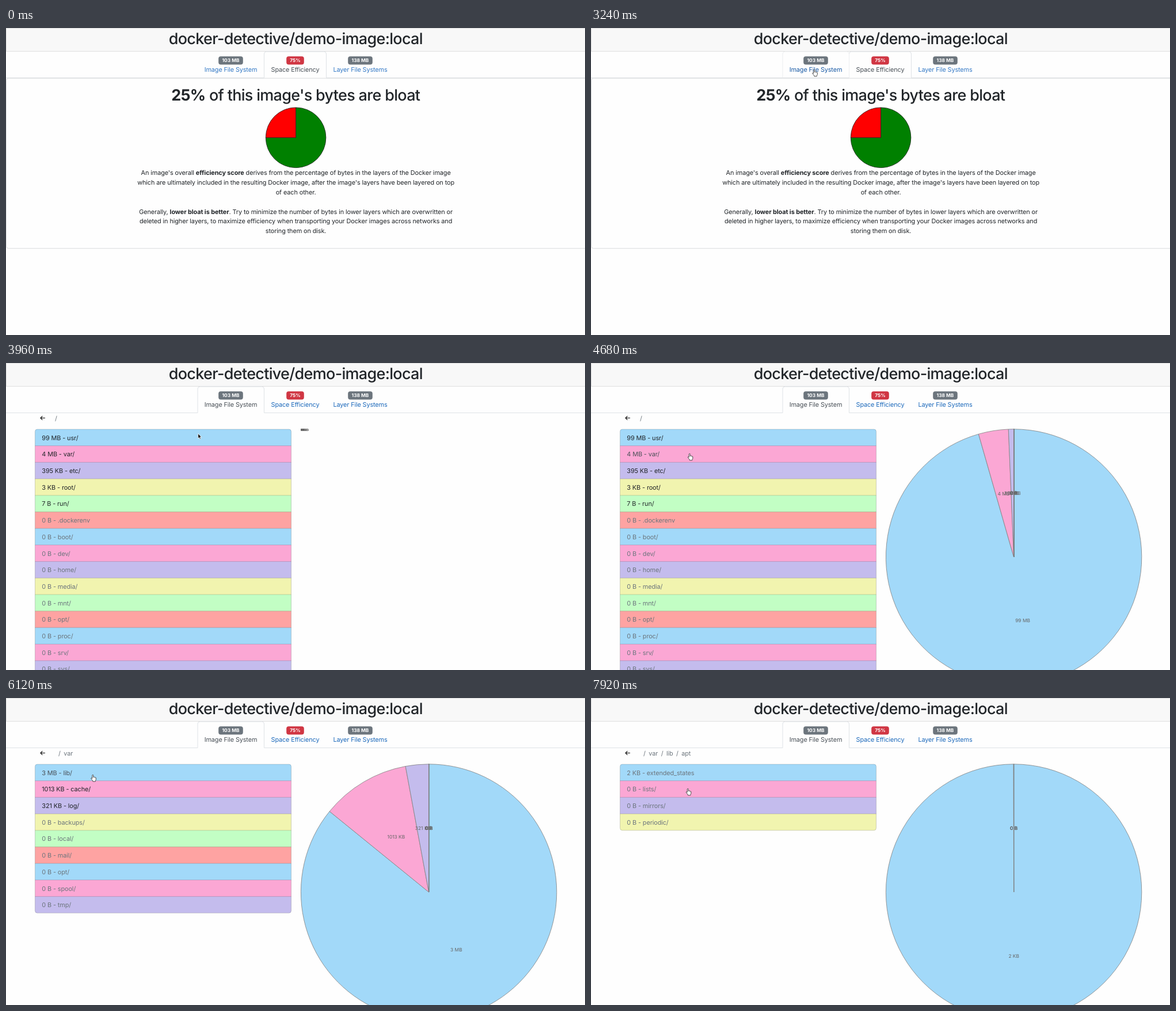
Recreate the animation shown at these times as an HTML page. Size 1006x533 px, loop 8 s.

```html
<!DOCTYPE html>
<html lang="en">
<head>
<meta charset="utf-8">
<title>Image inspector</title>
<style>
  html, body { margin: 0; width: 100%; height: 100%; overflow: hidden; background: #fefefe; }
  svg { display: block; }
  #stage { width: 1006px; height: 533px; }
  text {
    font: 400 10.9px Inter, "Liberation Sans", sans-serif;
    font-optical-sizing: none;
    letter-spacing: -.11px;
    text-rendering: geometricPrecision;
    fill: #212529;
    white-space: pre;
  }
  .mid { text-anchor: middle; }
  .big { font-size: 27px; font-weight: 500; letter-spacing: -.69px; }
  .bold { font-weight: 700; }
  .badge { font-size: 8.4px; font-weight: 700; letter-spacing: 0; fill: #fff; }
  .label { font-size: 8.4px; letter-spacing: 0; fill: #666; }
  .muted { fill: #6c757d; }
  .hover { fill: #495057; }
  .tab { fill: #495057; letter-spacing: -.14px; }
  .crumbs { fill: #6c757d; word-spacing: 2.5px; }
  .line { fill: none; stroke: #dee2e6; }
</style>
</head>
<body>
<svg id="stage" viewBox="0 0 1006 533">
  <defs>
    <clipPath id="round"><rect id="roundBox" x="50.5" y="115" width="445" rx="4"/></clipPath>
  </defs>
  <rect x=".5" y=".5" width="1010" height="40" fill="#f8f8f8" stroke="#dfdfdf"/>
  <text class="mid big" x="503.3" y="28">docker-detective/demo-image:local</text>
  <g id="tabs"></g>
  <g id="view"></g>
  <g id="cursor"></g>
</svg>
<script>
const LOOP = 8000, STEP = 360;
const COLORS = ['#a2d9f9', '#fba7d4', '#c4bced', '#f1f4af', '#c2fec4', '#fea3a2'];
const ROW = 28.7, TOP = 115;
const $ = id => document.getElementById(id);

const TABS = [
  { name: 'Image File System', badge: '103 MB', x: 390.5, left: 333, right: 448.5, w: 42.6 },
  { name: 'Space Efficiency', badge: '75%', x: 502.5, left: 448.5, right: 556.5, w: 30.6 },
  { name: 'Layer File Systems', badge: '138 MB', x: 615.5, left: 556.5, right: 675, w: 42.6 }
];

const empty = names => names.split(' ').map(n => '0 B - ' + n);

// "ends" are the slice end angles in degrees; later slices are empty
const FOLDERS = [
  { from: 3600, path: '/', ends: [344, 357.6],
    rows: ['99 MB - usr/', '4 MB - var/', '395 KB - etc/', '3 KB - root/', '7 B - run/',
      ...empty('.dockerenv boot/ dev/ home/ media/ mnt/ opt/ proc/ srv/ sys/')] },
  { from: 5400, path: '/ var', ends: [309.1, 349.5],
    rows: ['3 MB - lib/', '1013 KB - cache/', '321 KB - log/',
      ...empty('backups/ local/ mail/ opt/ spool/ tmp/')] },
  { from: 6840, path: '/ var / lib', ends: [340.3, 355.2],
    rows: ['3 MB - dpkg/', '2 KB - apt/', '709 B - systemd/', '425 B - pam/',
      ...empty('misc/ python/ shells.state')] },
  { from: 7920, path: '/ var / lib / apt', ends: [359.9],
    rows: ['2 KB - extended_states', ...empty('lists/ mirrors/ periodic/')] }
];

// time, x, y, is hand
const POINTER = [
  [3240, 389, 78, 1], [3600, 380, 86, 0], [3960, 336, 127, 0], [4320, 232, 156, 0],
  [4680, 172.5, 163, 1], [5400, 172.5, 163, 1], [5760, 168, 157, 1], [6120, 152, 139, 1],
  [6480, 146, 135, 1], [6840, 146, 135, 1], [7200, 150, 141, 1], [7560, 169.5, 163, 1]
];

const text = (s, x, y, cls = '') => `<text class="${cls}" x="${x}" y="${y}">${s}</text>`;

// CSS "ease" curve
function ease(x) {
  if (x <= 0) return 0;
  if (x >= 1) return 1;
  let lo = 0, hi = 1, s;
  for (let i = 0; i < 24; i++) {
    s = (lo + hi) / 2;
    if (.75 * s * (1 - s) + s ** 3 < x) lo = s; else hi = s;
  }
  return .3 * s * (1 - s) ** 2 + 3 * s * s * (1 - s) + s ** 3;
}

function polar(cx, cy, r, deg) {
  const a = deg * Math.PI / 180;
  return [cx + r * Math.sin(a), cy - r * Math.cos(a)];
}

function slice(cx, cy, r, a, b, fill, stroke) {
  const p = polar(cx, cy, r, a), q = polar(cx, cy, r, b);
  return `<path d="M${cx} ${cy}L${p}A${r} ${r} 0 ${b - a > 180 ? 1 : 0} 1 ${q}Z"
    fill="${fill}" stroke="${stroke}" stroke-width=".8" stroke-linejoin="round"/>`;
}

function drawTabs(active, hover) {
  const on = TABS[active];
  const edge = t => `M${t.left} 86.5V45q0-4 4-4H${t.right - 4}q4 0 4 4V86.5`;
  let s = `<path class="line" d="M0 86.5H${on.left}M${on.right} 86.5H1006${edge(on)}"/>`;
  if (hover >= 0) s += `<path class="line" style="stroke:#eceef0" d="${edge(TABS[hover])}"/>`;
  TABS.forEach((t, i) => {
    const link = i === hover ? '#1a5ba6' : active ? '#357ac6' : '#1c69bb';
    s += `<rect x="${t.x - t.w / 2}" y="49.2" width="${t.w}" height="14.3" rx="4" fill="${i === 1 ? '#d03643' : '#6c757d'}"/>`;
    s += text(t.badge, t.x, 59.4, 'mid badge');
    s += `<text class="mid tab" x="${t.x}" y="76"${i === active ? '' : ` style="fill:${link}"`}>${t.name}</text>`;
  });
  return s;
}

function drawEfficiency(t) {
  const bold = s => `<tspan class="bold">${s}</tspan>`;
  const shown = t < 1440 ? 1 : ease((t - 1103) / 1500);
  const split = 270 * shown, end = Math.min(360 * shown, 359.99);
  const lines = [
    `An image's overall ${bold('efficiency score')} derives from the percentage of bytes in the layers of the Docker image`,
    `which are ultimately included in the resulting Docker image, after the image's layers have been layered on top`,
    'of each other.',
    '',
    `Generally, ${bold('lower bloat is better')}. Try to minimize the number of bytes in lower layers which are overwritten or`,
    'deleted in higher layers, to maximize efficiency when transporting your Docker images across networks and',
    'storing them on disk.'
  ];
  return '<rect class="line" style="stroke:#dadcde" x=".5" y="87.2" width="1012" height="295.5" rx="4"/>'
    + text(bold('25%') + " of this image's bytes are bloat", 503.3, 126, 'mid big')
    + slice(503.6, 190.3, 52.3, 0, split, '#008000', '#222')
    + slice(503.6, 190.3, 52.3, split, end, '#f00', '#222')
    + lines.map((l, i) => text(l, 503.6, 255.3 + 16.8 * i, 'mid')).join('');
}

function drawChart(folder) {
  const cx = 734.6, cy = 337, r = 222.2;
  let slices = '', labels = '', a = 0;
  folder.rows.forEach((row, i) => {
    const b = folder.ends[i] ?? 360;
    const [x, y] = polar(cx, cy, r / 2, (a + b) / 2);
    slices += slice(cx, cy, r, a, b, COLORS[i % 6], '#808080');
    labels += text(row.split(' - ')[0], x, y + 3, 'mid label');
    a = b;
  });
  return slices + labels;
}

// before the chart gets its size, only clipped labels show in its corner
function drawCollapsed(folder) {
  return '<svg x="512" y="114" width="14" height="5">'
    + folder.rows.map(r => text(r.split(' - ')[0], 0, 4, 'mid label')).join('') + '</svg>';
}

function drawFolder(t, hover) {
  const folder = FOLDERS.filter(f => f.from <= t).pop();
  const h = ROW * folder.rows.length;
  $('roundBox').setAttribute('height', h);
  let rows = '', names = '';
  folder.rows.forEach((row, i) => {
    const y = TOP + ROW * i;
    const idle = row.startsWith('0 B') || !row.endsWith('/');
    rows += `<rect x="50" y="${y}" width="446" height="${ROW + .5}" fill="${COLORS[i % 6]}"/>`;
    if (i) rows += `<path d="M50 ${y}H496" stroke="#000" stroke-opacity=".16"/>`;
    names += text(row, 62.3, y + 18.6, idle ? 'muted' : i === hover ? 'hover' : '');
  });
  return '<path d="M68 95.5H60M63.3 92.2L60 95.5L63.3 98.8" fill="none" stroke="#111" stroke-width="1.2"/>'
    + text(folder.path, folder.path === '/' ? 85 : 91, 99.6, 'crumbs')
    + `<g clip-path="url(#round)">${rows}</g>`
    + `<rect x="50.5" y="${TOP}" width="445" height="${h}" rx="4" fill="none" stroke="#000" stroke-opacity=".16"/>`
    + names + (t < 4680 ? drawCollapsed(folder) : drawChart(folder));
}

function drawCursor([, x, y, hand]) {
  const d = hand
    ? 'M-2.2-4.6a1 1 0 0 1 2 0v3.2a.9.9 0 0 1 1.7.2a.9.9 0 0 1 1.5.4a.9.9 0 0 1 1.3.8v2.2q0 1.6-1 2.6v1.1h-4.4v-1l-2.9-3.7q-.7-1.2.3-1.4q.6-.1 1.5 1z'
    : 'M-2.3-4.5V4L-.4 2.3L.9 5.2L2.4 4.5L1.2 1.7H3.8Z';
  return `<path transform="translate(${x} ${y})" d="${d}" fill="${hand ? '#fff' : '#111'}"
    stroke="${hand ? '#222' : '#fff'}" stroke-width=".8" stroke-linejoin="round"/>`;
}

let last = -1;
function tick() {
  const step = Math.floor(performance.now() % LOOP / STEP);
  if (step !== last) {
    last = step;
    const t = step * STEP;
    const browsing = t >= 3600;
    const pointer = POINTER.filter(p => p[0] <= t).pop();
    const hover = pointer && pointer[3] ? Math.floor((pointer[2] - TOP) / ROW) : -1;
    $('tabs').innerHTML = drawTabs(browsing ? 0 : 1, t === 3240 ? 0 : -1);
    $('view').innerHTML = browsing ? drawFolder(t, hover) : drawEfficiency(t);
    $('cursor').innerHTML = pointer ? drawCursor(pointer) : '';
  }
  requestAnimationFrame(tick);
}
tick();
</script>
</body>
</html>
```
